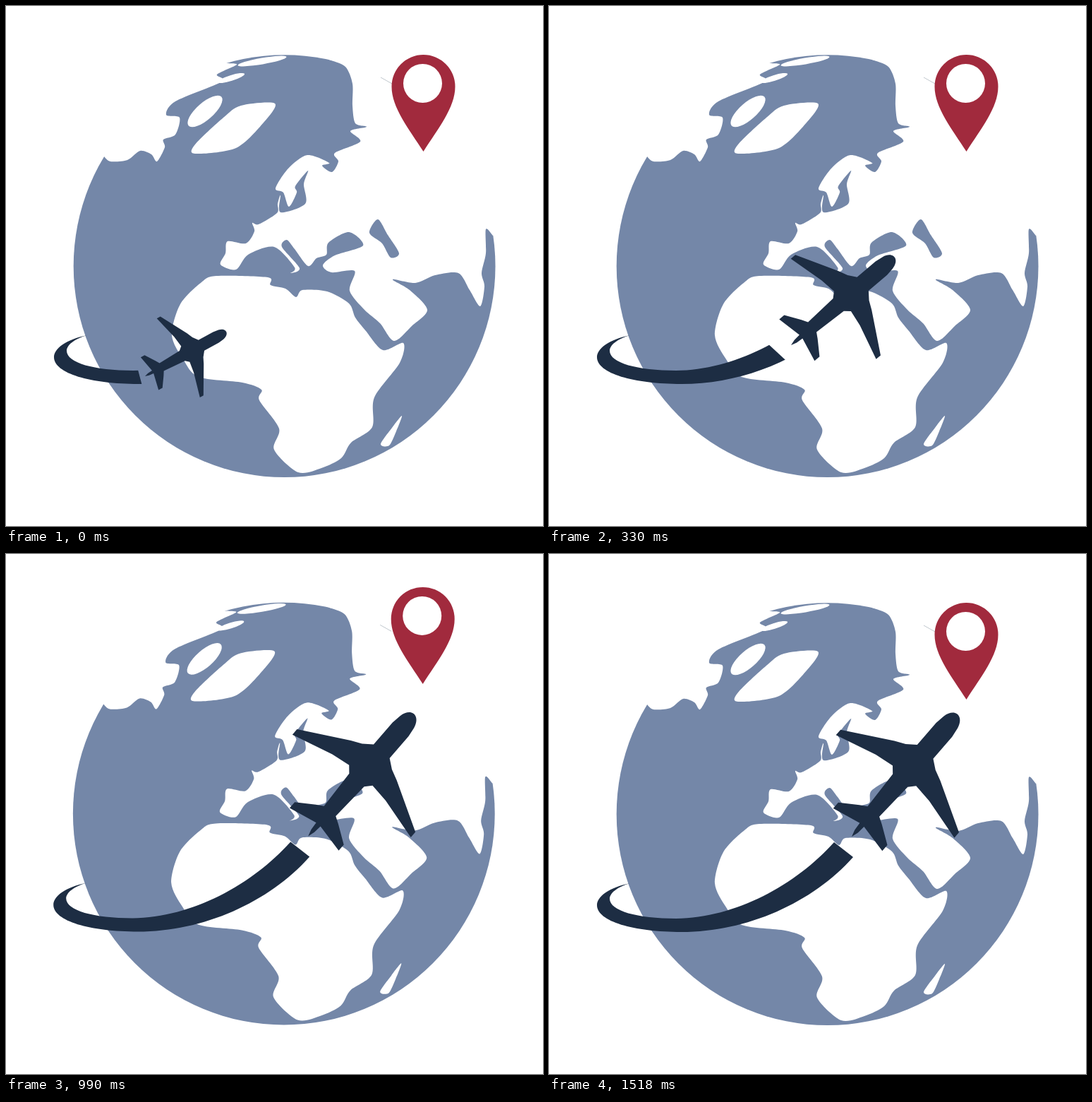
Recreate the animation shown at these times as an HTML page with a canvas. Size 761 by 736 pixels, loop 1.65 s.

```html
<!DOCTYPE html>
<html lang="en">
<head>
<meta charset="utf-8">
<title>Flight around the globe</title>
<style>
  html, body { margin: 0; width: 100%; height: 100%; overflow: hidden; background: #fff; }
  canvas { display: block; width: 761px; height: 736px; }
</style>
</head>
<body>
<canvas id="stage" width="761" height="736"></canvas>
<script>
const ctx = document.getElementById('stage').getContext('2d');
const SEA = '#7487a8', NAVY = '#1d2d43', RED = '#a12a3d', WHITE = '#fff';
const HOLD = 330;

// Key points of each coast, joined by smooth curves.
const america = [
  311,81, 327,83, 299,97, 306,107, 240,135, 227,154, 246,158, 240,182, 223,189,
  225,200, 214,220, 206,210, 190,205, 172,218, 148,220, 139,213
];
const north = [
  458,76, 481,86, 491,110, 491,141, 495,166, 511,171, 488,177, 502,192, 466,208,
  471,220, 462,235, 448,226, 458,222, 427,211, 400,230, 382,258,
  393,264, 401,284, 412,264, 410,255, 428,233, 422,252, 424,280, 389,292, 389,268
];
const europe = [
  385,280, 384,293, 358,309, 349,307, 352,319, 340,336, 314,333, 311,350, 304,366,
  326,373, 343,352, 380,341, 409,370, 403,378, 416,371, 391,341, 398,331, 409,344,
  428,368, 440,357, 454,352, 457,335, 486,320, 506,339, 466,353, 449,367, 461,377, 494,375
];
const asia = [
  487,403, 508,430, 530,449, 550,474, 575,453, 597,430, 572,402, 548,387, 580,392,
  608,381, 641,378, 657,402, 672,425, 678,397, 674,378, 680,350, 680,316, 690,325
];
const africa = [
  298,382, 371,384, 375,395, 396,400, 411,412, 420,402, 455,404, 486,421, 495,441,
  510,460, 534,487, 563,477, 558,505, 522,554, 519,596, 489,618, 475,640, 447,654,
  414,660, 380,628, 387,598, 359,558, 362,543, 335,533, 273,525, 251,500, 235,466,
  247,422, 277,391
];
const bigIsland = [333,141, 381,138, 365,165, 326,201, 268,209, 268,196, 308,158];
const southIsland = [561,580, 547,597, 531,620, 543,622, 553,602];
const lake = [527,302, 515,321, 533,336, 545,356, 557,350, 541,324];

// One side of the plane as (along, across) from its tail; the other side mirrors it.
const side = [
  214,13, 200,15, 159,15, 149,28, 142,43, 104,111, 94,111, 110,50, 114,22,
  105,14, 47,11, 41,21, 24,46, 13,46, 22,4, 10,3
];

const poses = [
  { x: 197, y: 524, size: .573, heading: -28.7, cut: [167, 199] },
  { x: 343, y: 480, size: .84, heading: -40.4, cut: [269, 399] },
  { x: 429, y: 400, size: 1, heading: -49.1, cut: [500, 500] }
];

const trail = new Path2D(`M115 466C85 472 68 485 68 497C68 520 120 535 188 535
  C280 535 373 494 431 429L404 408C350 468 265 515 180 516C125 516 86 505 86 488
  C86 480 97 471 115 466Z`);
const marker = new Path2D(`M591.5 206C571 174 546.5 144 546.5 114A45 45 0 0 1 636.5 114
  C636.5 144 612 174 591.5 206Z`);

function pairs(list) {
  return Array.from({ length: list.length / 2 }, (_, i) => [list[2 * i], list[2 * i + 1]]);
}

function curve(path, list, closed) {
  const p = pairs(list), n = p.length;
  const at = i => p[closed ? (i + n) % n : Math.max(0, Math.min(n - 1, i))];
  path.moveTo(...p[0]);
  for (let i = 0; i < (closed ? n : n - 1); i++) {
    const [a, b, c, d] = [at(i - 1), at(i), at(i + 1), at(i + 2)];
    path.bezierCurveTo(b[0] + (c[0] - a[0]) / 7, b[1] + (c[1] - a[1]) / 7,
      c[0] - (d[0] - b[0]) / 7, c[1] - (d[1] - b[1]) / 7, ...c);
  }
}

function blob(list) {
  const path = new Path2D();
  curve(path, list, true);
  return path;
}

function coast(list, ...corners) {
  const path = new Path2D();
  curve(path, list, false);
  for (const corner of corners) path.lineTo(...corner);
  path.closePath();
  return path;
}

function oval(x, y, rx, ry, tilt) {
  const path = new Path2D();
  path.ellipse(x, y, rx, ry, tilt, 0, Math.PI * 2);
  return path;
}

function mirrored(list, nose) {
  const half = pairs(list);
  const path = new Path2D();
  path.moveTo(0, 0);
  for (const [x, y] of [...half].reverse()) path.lineTo(x, y);
  path.bezierCurveTo(nose, 9, nose, -9, half[0][0], -half[0][1]);
  for (const [x, y] of half) path.lineTo(x, -y);
  path.closePath();
  return path;
}

const land = [
  coast(america, [-9, 213], [-9, -9], [311, -9]),
  coast([...north, ...europe, ...asia], [770, 325], [770, -9], [458, -9]),
  blob(africa),
  blob(bigIsland),
  blob(southIsland),
  oval(282, 149, 31, 12, -.72),
  oval(319, 102, 20, 4, -.3),
  oval(363, 78, 35, 4.5, -.17)
];
const caspian = blob(lake);
const plane = mirrored(side, 234);

function fill(path, color) {
  ctx.fillStyle = color;
  ctx.fill(path);
}

function disc(x, y, r, color) {
  fill(oval(x, y, r, r, 0), color);
}

function drawGlobe() {
  disc(394.6, 368.2, 298.9, SEA);
  for (const path of land) fill(path, WHITE);
  fill(caspian, SEA);
  ctx.strokeStyle = '#a5afb8';
  ctx.lineWidth = .7;
  ctx.beginPath();
  ctx.moveTo(531, 101);
  ctx.lineTo(547, 110);
  ctx.stroke();
}

function drawFlight({ x, y, size, heading, cut }) {
  ctx.save();
  ctx.beginPath();
  ctx.moveTo(50, 440);
  // An uncut trail also reaches above the clip band.
  ctx.lineTo(50, 380);
  ctx.lineTo(cut[0] - (cut[1] - cut[0]) / 2, 380);
  ctx.lineTo(cut[1], 560);
  ctx.lineTo(50, 560);
  ctx.clip();
  fill(trail, NAVY);
  ctx.restore();

  ctx.save();
  ctx.translate(x, y);
  ctx.rotate(heading * Math.PI / 180);
  ctx.scale(size, size);
  fill(plane, NAVY);
  ctx.restore();
}

function drawMarker(lift) {
  ctx.save();
  ctx.translate(0, -lift);
  fill(marker, RED);
  disc(590.5, 109.5, 27.5, WHITE);
  ctx.restore();
}

function draw(now) {
  const step = Math.floor(now / HOLD) % 5;
  const hop = step === 3;
  ctx.fillStyle = WHITE;
  ctx.fillRect(0, 0, 761, 736);
  ctx.save();
  if (hop) ctx.translate(-.8, -.6);
  drawGlobe();
  drawFlight(poses[Math.min(step, 2)]);
  drawMarker(hop ? 21.5 : 0);
  ctx.restore();
}

let start;
function tick(now) {
  start ??= now;
  draw(now - start);
  requestAnimationFrame(tick);
}
draw(0);
requestAnimationFrame(tick);
</script>
</body>
</html>
```
